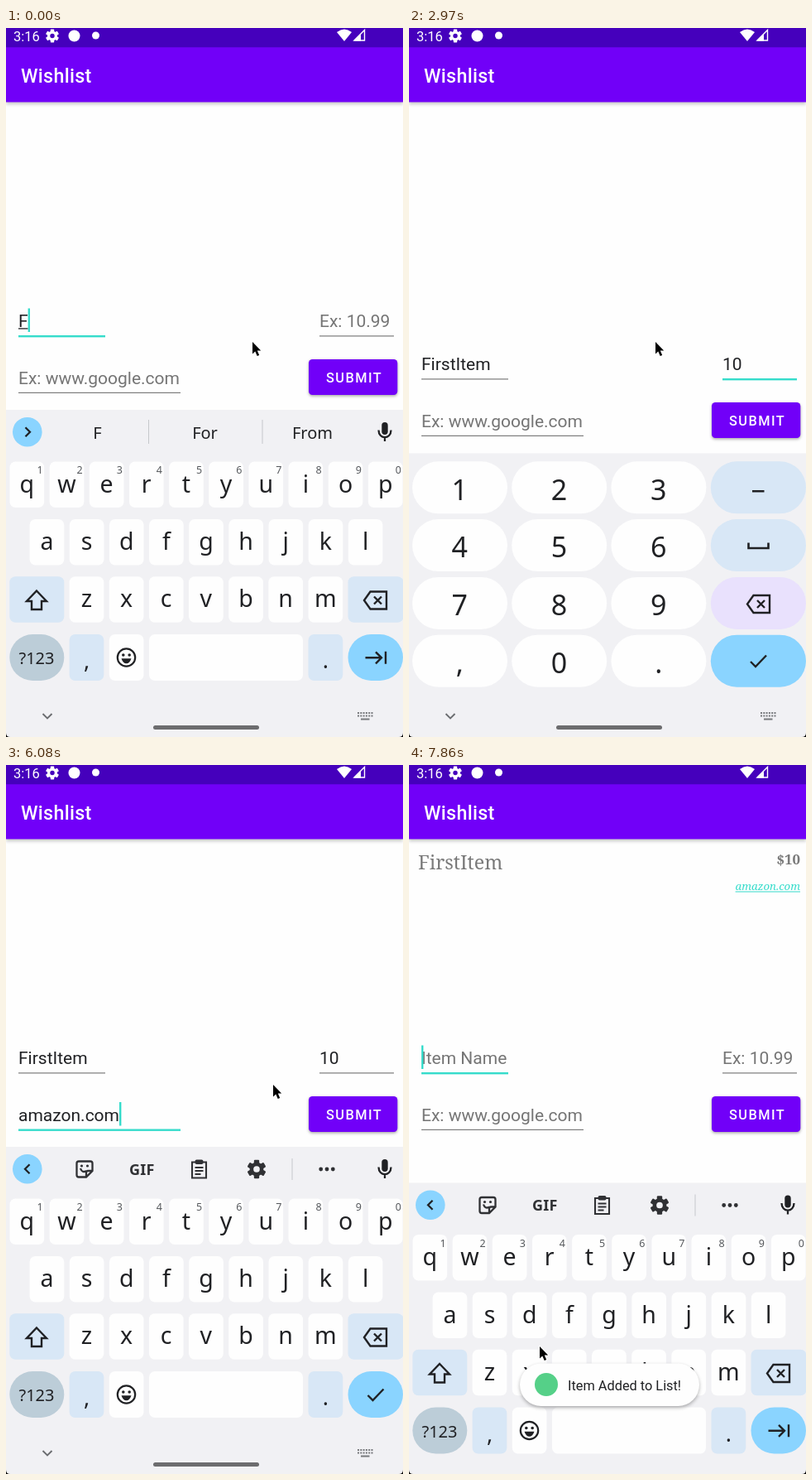
An HTML page with a canvas for the animation above (8 s loop, 480 by 856 pixels).

```html
<!DOCTYPE html>
<html lang="en">
<head>
<meta charset="utf-8">
<title>Wishlist</title>
<style>
html, body { margin: 0; width: 100%; height: 100%; overflow: hidden; background: #fefefe; }
canvas { display: block; width: 100vw; height: 100vh; }
</style>
</head>
<body>
<canvas id="stage"></canvas>
<script>
const W = 480, H = 856, LOOP = 8000;
const canvas = document.getElementById('stage');
const c = canvas.getContext('2d');
const dpr = window.devicePixelRatio || 1;
canvas.width = W * dpr;
canvas.height = H * dpr;

const PURPLE = '#7100f8', TEAL = '#35dccb', INK = '#202124', HINT = '#757575';
const BOARD = '#f1f1f4', KEY = '#fefefe', FUNC = '#d8e7f6', BLUE = '#8ad4ff';
const UI = 'Roboto, sans-serif', KB = '"Noto Sans", sans-serif', SERIF = '"Noto Serif", serif';

// Timelines: [start ms, value]
const NAME = [[0, 'F'], [290, 'Fir'], [440, 'First'], [590, 'FirstIt'], [740, 'FirstItem'], [6670, '']];
const PRICE = [[0, ''], [2380, '1'], [2520, '10'], [6670, '']];
const ADDRESS = 'amazon.com';
const FOCUS = [[0, 'name'], [1190, 'price'], [3120, 'url'], [7570, 'name']];
const CARET = [[0, 1], [2080, 0], [2380, 1], [2970, 0], [3120, 1], [3570, 0], [3860, 1],
  [5640, 0], [6080, 1], [7120, 0], [7570, 1]];
const FORM_Y = [[0, 0], [1780, 52], [3120, 0], [6820, 369], [7720, 0]];
const BOARD_Y = [[0, 0], [6820, 150], [6970, 330], [7120, 400], [7720, 220], [7860, 43.5]];
const LAYOUT = [[0, 'abc'], [1490, 'num'], [3120, 'abc']];
const WORDS = [[0, 'F For From'], [290, 'Fir First Fire'], [440, 'First Firsts Firstly'],
  [590, 'FirstIt Firsts Firstly'], [740, 'FirstItem Firstitem Firsts'], [1190, ''],
  [3860, 'a and at'], [4010, 'am amazed AM'], [4310, 'ama amazed amazing'],
  [4460, 'amaz amazed amazing'], [5050, '']];
const MOUSE = [[0, [298, 379]], [6080, [323, 386]], [6230, [378, 404]], [6380, [416, 418]],
  [6820, [390, 448]], [6970, [300, 550]], [7120, [180, 635]], [7270, [111, 667]],
  [7420, [84, 708]], [7570, [78, 720]], [7720, [106, 716]], [7860, [158, 702]]];

function at(line, t) {
  let v = line[0][1];
  for (const [start, value] of line) if (t >= start) v = value;
  return v;
}

function typedUrl(t) {
  if (t < 3860 || t >= 6670) return '';
  return ADDRESS.slice(0, Math.floor((t - 3860) / 148.5 + 0.05) + 1);
}

function rect(x, y, w, h, color) {
  c.fillStyle = color;
  c.fillRect(x, y, w, h);
}

function round(x, y, w, h, r, color) {
  c.fillStyle = color;
  c.beginPath();
  c.roundRect(x, y, w, h, r);
  c.fill();
}

function disc(x, y, r, color) {
  c.fillStyle = color;
  c.beginPath();
  c.arc(x, y, r, 0, 7);
  c.fill();
}

function ring(x, y, r, width, color = INK) {
  c.strokeStyle = color;
  c.lineWidth = width;
  c.beginPath();
  c.arc(x, y, r, 0, 7);
  c.stroke();
}

function text(s, x, y, font, color, align = 'left', spacing = 0) {
  c.font = font;
  c.fillStyle = color;
  c.textAlign = align;
  c.letterSpacing = spacing + 'px';
  c.fillText(s, x, y);
  return c.measureText(s).width;
}

function icon(d, x, y, width = 2.4, color = INK) {
  c.save();
  c.translate(x, y);
  const p = new Path2D(d);
  if (width) {
    c.lineWidth = width;
    c.strokeStyle = color;
    c.stroke(p);
  } else {
    c.fillStyle = color;
    c.fill(p);
  }
  c.restore();
}

function shadowed(blur, dy, alpha, draw) {
  c.save();
  c.shadowColor = `rgba(0,0,0,${alpha})`;
  c.shadowBlur = blur * dpr;
  c.shadowOffsetY = dy * dpr;
  draw();
  c.restore();
}

function gear(x, y, r, color, hole) {
  c.save();
  c.translate(x, y);
  for (let i = 0; i < 6; i++) {
    c.rotate(Math.PI / 3);
    round(-r * 0.28, -r, r * 0.56, r, r * 0.1, color);
  }
  c.restore();
  disc(x, y, r * 0.74, color);
  disc(x, y, r * 0.34, hole);
}

function statusBar() {
  rect(0, 0, W, 23.3, '#4500bc');
  text('3:16', 9, 16, '16.5px ' + UI, '#fff');
  gear(56, 9.5, 8, '#fff', '#4500bc');
  disc(82.5, 9.5, 7, '#fff');
  disc(108.5, 9, 4.5, '#fff');
  icon('M0 0L-9 -11Q0 -18 9 -11Z', 409, 16, 0, '#fff');
  icon('M-12.5 0L0 -12.5V0Z', 433.5, 15, 1.4, '#fff');
  icon('M-13 0L-5 -8V0Z', 434, 15.5, 0, '#fff');
}

function appBar() {
  shadowed(4, 2, 0.22, () => rect(0, 20, W, 69.5, PURPLE));
  text('Wishlist', 18, 66, '500 23.33px ' + UI, '#fff', 'left', 0.3);
  statusBar();
}

function listItem() {
  text('FirstItem', 11, 126, '23.33px ' + SERIF, '#7a7a7a');
  text('$10', 473, 120, 'bold 17px ' + SERIF, '#7a7a7a', 'right');
  const w = text(ADDRESS, 473, 151, 'italic 13.2px ' + SERIF, TEAL, 'right');
  rect(473 - w, 152.5, w, 1, TEAL);
}

function field(x, y, w, value, hint, focused, caret, composing = '') {
  const font = '21px ' + UI;
  text(value || hint, x, y, font, value ? INK : HINT);
  if (focused) rect(x, y + 10, w, 2.4, TEAL);
  else rect(x, y + 10.3, w, 1.2, '#7c7c7c');
  c.font = font;
  if (composing) rect(x, y + 1.3, c.measureText(composing).width, 1.3, INK);
  if (focused && caret) rect(x + c.measureText(value).width, y - 22.5, 2.4, 28.5, TEAL);
}

function form(t) {
  const focus = at(FOCUS, t), caret = at(CARET, t);
  const name = at(NAME, t), url = typedUrl(t);
  const part = url.includes('.') ? '' : url.slice(0, Math.max(1, url.length - 1));
  c.save();
  c.translate(0, at(FORM_Y, t));
  field(15, 361, 105, name, 'Item Name', focus === 'name', caret, t < 1040 ? name : '');
  field(379, 361, 90, at(PRICE, t), 'Ex: 10.99', focus === 'price', caret);
  field(15, 429.5, 196, url, 'Ex: www.google.com', focus === 'url', caret, url && part);
  const fill = t >= 6530 && t < 7420 ? '#7d00ff' : PURPLE;
  shadowed(3.5, 1.5, 0.35, () => round(366, 400, 107.3, 43, 4.5, fill));
  text('SUBMIT', 387, 428, '500 16.33px ' + UI, '#fff', 'left', 1.46);
  c.restore();
}

function backspace(x, y) {
  icon('M-6 -10.5H13.5V10.5H-6L-13.5 0ZM-1.5 -4.5L7.5 4.5M7.5 -4.5L-1.5 4.5', x, y, 2.4);
}

function check(x, y) {
  icon('M-9.5 .5L-3.5 6.5L9.5 -7', x, y, 2.4);
}

function mic(x, y) {
  round(x - 3.7, y - 12, 7.4, 15, 3.7, INK);
  icon('M-7.5 -2.5C-7.5 9 7.5 9 7.5 -2.5M0 6V11', x, y, 2.3);
}

function strip(words) {
  disc(25.8, 487.7, 17.8, BLUE);
  mic(458, 488);
  if (words) {
    icon('M-2.5 -5.5L3 0L-2.5 5.5', 26, 487.7, 2.3);
    words.split(' ').forEach((w, i) => text(w, 110.5 + 130 * i, 496, '20px ' + KB, INK, 'center'));
    rect(172, 473, 1, 29, '#c6c8cb');
    rect(309.5, 473, 1, 29, '#c6c8cb');
    return;
  }
  icon('M2.5 -5.5L-3 0L2.5 5.5', 26, 487.7, 2.3);
  icon('M-7 -9.5H7Q9.5 -9.5 9.5 -7V2L2 9.5H-7Q-9.5 9.5 -9.5 7V-7Q-9.5 -9.5 -7 -9.5ZM9.5 2H4Q2 2 2 4V9.5' +
    'M-5 -1Q-3 5 2 2', 95, 488, 2.3, '#303134');
  disc(91.5, 484, 1.6, '#303134');
  disc(98.5, 484, 1.6, '#303134');
  text('GIF', 164.3, 494.5, '900 18px ' + KB, '#303134', 'center', 0.3);
  icon('M-8.5 -8.5H8.5V10.5H-8.5ZM-5 -2H5M-5 2H5M-5 6H2', 233.5, 488, 2.1, '#303134');
  round(228.5, 476.5, 10, 5.5, 2, '#303134');
  gear(303, 488, 11.3, '#303134', BOARD);
  rect(345.5, 475, 1, 26, '#c6c8cb');
  for (let i = -1; i < 2; i++) disc(388 + 7.3 * i, 488, 2.4, '#303134');
}

function letters(row, x0, y, digits) {
  [...row].forEach((ch, i) => {
    const x = x0 + 48.15 * i;
    round(x, y, 41.7, 55.5, 7, KEY);
    text(ch, x + 20.8, y + 37, '28.5px ' + KB, INK, 'center');
    if (digits) text((i + 1) % 10, x + 36.5, y + 14.5, '500 12.5px ' + KB, '#55585c', 'center');
  });
}

function abcBoard(t) {
  rect(0, 461, W, 460, BOARD);
  strip(at(WORDS, t));
  letters('qwertyuiop', 4.5, 523.5, true);
  letters('asdfghjkl', 28.6, 593);
  letters('zxcvbnm', 76.6, 662.3);
  round(4.3, 662.3, 66, 55.5, 7, FUNC);
  icon('M0 -11.5L12 1H6V11H-6V1H-12Z', 37, 691, 2.4);
  round(413.5, 662.3, 67, 55.5, 7, FUNC);
  backspace(446.5, 691);
  const y = 732;
  round(4.3, y, 66, 56, 28, '#bccdd8');
  text('?123', 37, 768, '500 20px ' + KB, INK, 'center');
  round(76.6, y, 41.7, 56, 7, FUNC);
  text(',', 97.5, 773, '27px ' + KB, INK, 'center');
  round(124.8, y, 41.7, 56, 7, KEY);
  ring(145.5, 760, 10.7, 2.2);
  disc(141.8, 757, 1.8, INK);
  disc(149.2, 757, 1.8, INK);
  icon('M-6 0H6Q4 6 0 6Q-4 6 -6 0Z', 145.5, 761.3, 0);
  round(173, y, 186, 56, 7, KEY);
  round(365.5, y, 41.7, 56, 7, FUNC);
  text('.', 386.3, 773, '27px ' + KB, INK, 'center');
  round(413.5, y, 66.5, 56, 28, BLUE);
  if (at(FOCUS, t) === 'url') check(447, 760.5);
  else icon('M-12.5 0H7M0 -7L7 0L0 7M12 -7.5V7.5', 447, 760.3, 2.4);
}

function numBoard() {
  rect(0, 513.5, W, 400, BOARD);
  ['123', '456', '789', ',0.'].forEach((row, j) => {
    const y = 523.3 + 69.8 * j;
    [...row].forEach((ch, i) => {
      round(4 + 120.2 * i, y, 115, 63, 31.5, KEY);
      text(ch, 61.3 + 120.2 * i, y + 46.3, '34px ' + KB, INK, 'center');
    });
    round(364.8, y, 115.2, 63, 31.5, [FUNC, FUNC, '#e9e1fd', BLUE][j]);
  });
  rect(415, 558, 14.5, 2.5, INK);
  icon('M-12 -3.5V3H12V-3.5', 422.5, 625, 2.6);
  backspace(422.5, 695.5);
  check(422.5, 764.5);
}

function keyboard(t) {
  const dy = at(BOARD_Y, t);
  if (dy >= 395) return;
  c.save();
  c.translate(0, dy);
  if (at(LAYOUT, t) === 'num') numBoard();
  else abcBoard(t);
  icon('M-5.5 -2.5L0 3L5.5 -2.5', 50, 830.5, 1.9, '#6b6d70');
  for (let j = 0; j < 2; j++)
    for (let i = 0; i < 6; i++) rect(425 + 3.3 * i, 826 + 3.5 * j, 2, 2, '#77797c');
  rect(429, 833.5, 10.5, 2, '#77797c');
  round(178, 842, 128, 5, 2.5, '#6c6c6e');
  c.restore();
}

function toast(alpha) {
  c.save();
  c.globalAlpha = alpha;
  shadowed(4, 2, 0.3, () => round(134, 722.5, 217, 51.5, 25.7, '#fefefe'));
  disc(166, 748, 14, '#55d088');
  text('Item Added to List!', 192, 754.5, '16.33px ' + UI, INK);
  c.restore();
}

function mouse([x, y]) {
  const arrow = 'M0 0V14.5L3.3 11.5L5.7 17L8.2 15.9L5.8 10.6H10.2Z';
  c.lineJoin = 'round';
  icon(arrow, x, y, 2, '#fff');
  icon(arrow, x, y, 0, '#000');
  c.lineJoin = 'miter';
}

function draw(t) {
  c.setTransform(dpr, 0, 0, dpr, 0, 0);
  rect(0, 0, W, H, '#fefefe');
  appBar();
  if (t >= 6670) listItem();
  form(t);
  rect(0, 830.7, W, 26, '#000');
  round(178, 842, 128, 5, 2.5, '#c9c9c9');
  keyboard(t);
  if (t >= 6820) toast(t < 6970 ? 0.5 : 1);
  icon('M0 0V-5Q0 0 5 0Z', 0, H, 0, '#000');
  icon('M0 0V-5Q0 0 -5 0Z', W, H, 0, '#000');
  mouse(at(MOUSE, t));
}

const start = performance.now();
function tick() {
  draw((performance.now() - start) % LOOP);
  requestAnimationFrame(tick);
}
tick();
</script>
</body>
</html>
```
